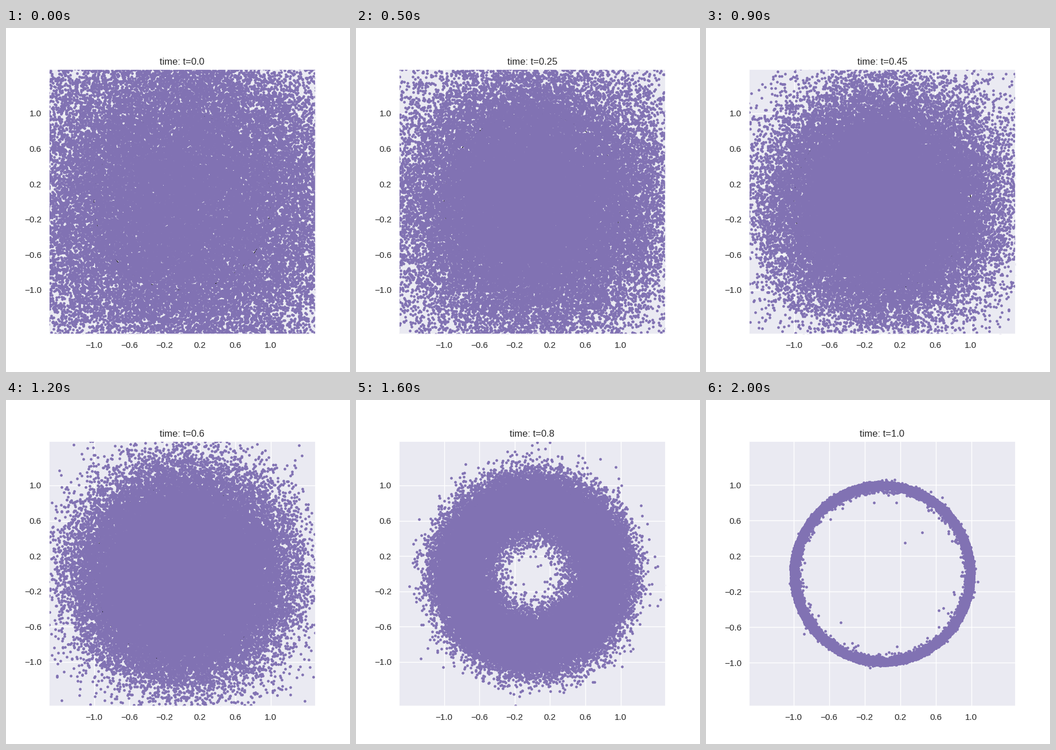
Write a matplotlib script that moves like this. It is 600 by 600 pixels and loops after 2.1 s.

```python
import numpy as np
import matplotlib.pyplot as plt
from matplotlib.animation import FuncAnimation

plt.rcParams.update({
    "font.family": "Liberation Sans",
    "text.color": ".15",
    "axes.facecolor": "#EAEAF2",
    "axes.edgecolor": "white",
    "axes.linewidth": 1.25,
    "axes.axisbelow": True,
    "axes.grid": True,
    "axes.titlesize": 12,
    "grid.color": "white",
    "grid.linewidth": 1,
    "xtick.labelsize": 11,
    "ytick.labelsize": 11,
    "xtick.color": ".15",
    "ytick.color": ".15",
    "xtick.major.size": 6,
    "ytick.major.size": 6,
    "xtick.bottom": False,
    "ytick.left": False,
})

STEPS = 20
COUNT = 50000

rng = np.random.default_rng(7)
noise = rng.standard_normal((2, COUNT))
angle = rng.uniform(0, 2 * np.pi, COUNT)

# final radii: sharp outer rim, ragged inner rim, a few stragglers at both ends
rank = np.arange(1, COUNT + 1)
final = np.sort(1.008 - 0.014 * rng.gumbel(size=COUNT))
final += 0.07 * rank[::-1] ** -0.6 - 0.43 * rank ** -0.9


def radii(t):
    """Radial flow from a Gaussian to the unit circle; particles keep their rank."""
    spread = (1 - t) * (1 - 0.2 * t * (1 - t))
    r = np.sort(np.hypot(t + spread * noise[0], spread * noise[1]))
    return r + t ** 12 * (final - r)


fig, ax = plt.subplots(figsize=(6, 6), dpi=100)
ticks = np.linspace(-1, 1, 6)
ax.set_xticks(ticks)
ax.set_yticks(ticks)

turn = np.linspace(0, 2 * np.pi, 300)
ax.plot(np.cos(turn), np.sin(turn), color="black", lw=1)
dots, = ax.plot([], [], "o", color="#8172B3", ms=3.4, mew=0)
title = ax.set_title("")


def set_view(t):
    # equal scales: widen x at first, trim y once the cloud fits inside
    box = ax.get_position()
    ratio = box.width / box.height
    x, y = (1.5, 1.5 / ratio) if t > 0.82 else (1.5 * ratio, 1.5)
    ax.set_xlim(-x, x)
    ax.set_ylim(-y, y)


def update(i):
    t = i / STEPS
    r = radii(t)
    dots.set_data(r * np.cos(angle), r * np.sin(angle))
    title.set_text(f"time: t={round(t, 2)}")
    set_view(t)
    return dots, title


anim = FuncAnimation(fig, update, frames=STEPS + 1, interval=100,
                     repeat=True, repeat_delay=0)
plt.show()
```
